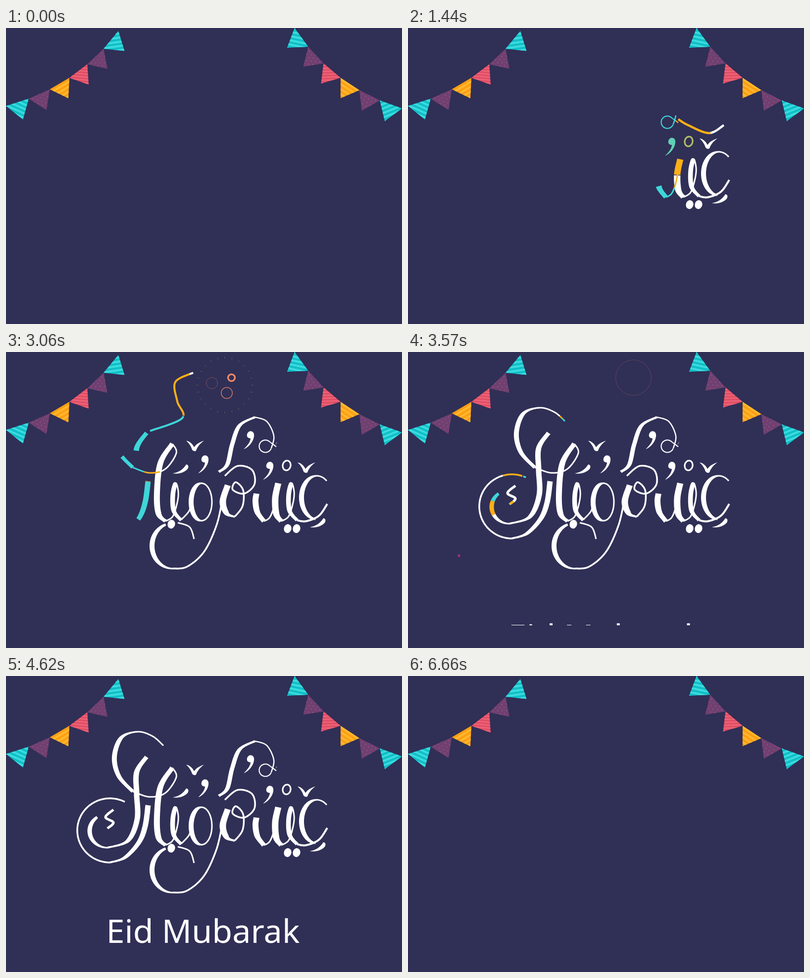
An HTML page with a canvas for the animation above (6690 ms loop, 800 by 600 pixels).

```html
<!DOCTYPE html>
<html lang="en">
<head>
<meta charset="utf-8">
<title>Eid Mubarak</title>
<style>
html, body { margin: 0; width: 100%; height: 100%; overflow: hidden; background: #302f56; }
canvas { display: block; }
</style>
</head>
<body>
<canvas id="stage" width="800" height="600"></canvas>
<script>
const ctx = document.getElementById('stage').getContext('2d');
const LOOP = 6690, CLEAR = 6660;
const BG = '#302f56', TEAL = [62, 214, 216], ORANGE = [253, 176, 22], WHITE = [255, 255, 255];

const clamp = v => Math.max(0, Math.min(1, v));
const easeOut = v => 1 - (1 - clamp(v)) ** 2;
const rgb = (c, a = 1) => `rgba(${c.map(Math.round).join()},${a})`;
const mix = (a, b, k) => a.map((v, i) => v + (b[i] - v) * k);
const rad = deg => deg * Math.PI / 180;

// ---- bunting: six flags hung along a quadratic string ----
const flagStyles = {
  teal: ['#10bfc8', '#3ddbdd'],
  plum: ['#704070', '#93568a'],
  red: ['#e24e65', '#ee6a7c'],
  gold: ['#ff9f12', '#ffb830']
};
const order = ['teal', 'plum', 'red', 'gold', 'plum', 'teal'];

function drawString(start, bend, end, side) {
  const at = u => start.map((s, i) => s * (1 - u) ** 2 + 2 * bend[i] * u * (1 - u) + end[i] * u * u);
  order.forEach((style, i) => drawFlag(style, at(i / 6), at((i + 1) / 6), side));
}

// Local frame: x runs along the string, the tip hangs towards side * y.
function drawFlag(style, a, b, side) {
  const [base, detail] = flagStyles[style];
  const dx = b[0] - a[0], dy = b[1] - a[1], half = Math.hypot(dx, dy) / 2;
  ctx.save();
  ctx.translate((a[0] + b[0]) / 2, (a[1] + b[1]) / 2);
  ctx.rotate(Math.atan2(dy, dx));
  ctx.beginPath();
  ctx.moveTo(-half, 0);
  ctx.lineTo(half, 0);
  ctx.lineTo(0, side * half * 1.52);
  ctx.closePath();
  ctx.fillStyle = base;
  ctx.fill();
  ctx.clip();
  ctx.rotate(style === 'gold' ? 0 : rad(-42 * side));
  ctx.fillStyle = detail;
  const thick = style === 'red' ? 2 : 4, gap = style === 'red' ? 6 : 8.5;
  for (let row = -6; row <= 6; row++) {
    if (style !== 'plum') {
      ctx.fillRect(-50, row * gap, 100, thick);
      continue;
    }
    for (let col = -5; col <= 5; col++) {
      ctx.beginPath();
      ctx.arc(col * 9 + (row & 1) * 4.5, row * 6.5, 1.1, 0, 7);
      ctx.fill();
    }
  }
  ctx.restore();
}

// ---- lettering: key points or arcs, with the width set by the pen's direction ----
function spline(text) {
  const k = text.split(',').map(s => s.trim().split(' ').map(Number));
  const pts = [k[0]];
  for (let i = 0; i < k.length - 1; i++) {
    const a = k[i - 1] || k[i], b = k[i], c = k[i + 1], d = k[i + 2] || c;
    for (let u = 1 / 24; u < 1.01; u += 1 / 24) {
      pts.push(b.map((_, j) => 0.5 * (2 * b[j] + (c[j] - a[j]) * u +
        (2 * a[j] - 5 * b[j] + 4 * c[j] - d[j]) * u * u +
        (3 * b[j] - a[j] - 3 * c[j] + d[j]) * u ** 3)));
    }
  }
  return pts;
}

function arc(cx, cy, rx, ry, from, to) {
  return Array.from({ length: 121 }, (_, i) => {
    const a = rad(from + (to - from) * i / 120);
    return [cx + rx * Math.cos(a), cy + ry * Math.sin(a)];
  });
}

const shape = s => typeof s === 'string' ? spline(s) : s;
const hair = (path, w = 3) => ({ pts: shape(path), thin: w, thick: w, dir: 1 });
const up = (thick, path) => ({ pts: shape(path), thin: 3, thick, dir: -1 });
const down = (thick, path) => ({ pts: shape(path), thin: 3, thick, dir: 1 });
const tooth = x => up(9.5, `${x + 11} 341, ${x - 4} 322, ${x - 6} 290, ${x} 266,
  ${x + 5} 283, ${x + 3} 305, ${x - 6} 333, ${x - 21} 343`);

function stroke(t0, dur, pens, opt = {}) {
  let len = 0;
  const parts = pens.map(({ pts, thin, thick, dir }) => pts.map(([x, y], i) => {
    const a = pts[Math.max(0, i - 1)], b = pts[Math.min(pts.length - 1, i + 1)];
    const d = Math.hypot(b[0] - a[0], b[1] - a[1]) || 1;
    const tx = (b[0] - a[0]) / d, ty = (b[1] - a[1]) / d;
    const r = (thin + (thick - thin) * clamp(dir * ty) ** 1.5) / 2;
    if (i) len += Math.hypot(x - a[0], y - a[1]);
    return { x, y, nx: -ty * r, ny: tx * r, len };
  }));
  const flight = opt.fly ? parts[0][parts[0].length - 1].len : 0;
  return { t0, dur, parts, len, flight, lag: opt.lag || [110, 195] };
}

function ribbon(s, from, to, color) {
  if (to <= from) return;
  ctx.fillStyle = rgb(color);
  for (const part of s.parts) {
    const run = part.filter(p => p.len >= from - 1 && p.len <= to);
    if (run.length < 2) continue;
    ctx.beginPath();
    run.forEach(p => ctx.lineTo(p.x + p.nx, p.y + p.ny));
    run.reverse().forEach(p => ctx.lineTo(p.x - p.nx, p.y - p.ny));
    ctx.fill();
  }
}

// Teal leads, orange and white follow; a flying line also loses its tail.
function drawStroke(s, t) {
  const reach = lag => s.len * easeOut((t - lag - s.t0) / s.dur);
  const tail = Math.min(s.flight, reach(230));
  const [front, mid, back] = [0, ...s.lag].map(reach);
  ribbon(s, tail, back, WHITE);
  ribbon(s, Math.max(tail, back), mid, ORANGE);
  ribbon(s, Math.max(tail, mid), front, TEAL);
}

const strokes = [
  stroke(760, 500, [down(10, arc(628, 295, 31, 44, -50, -265))]),
  stroke(890, 750, [
    hair('649 308, 632 332, 606 343, 588 341', 4),
    tooth(577),
    up(13, '556 343, 546 328, 544 296, 550 266'),
    hair('549 268, 542 310, 533 335, 521 343'),
    up(12, '521 343, 508 325, 504 303, 506 287')
  ], { lag: [125, 260] }),
  stroke(1215, 780, [
    hair('638 197, 608 213, 566 197, 546 185', 4.5),
    hair('546 192, 534 183', 2.2),
    hair(arc(524, 191, 12.5, 12.5, -40, -340), 2.2),
    hair('536 195, 541 170, 527 141, 503 132', 2.5),
    down(9, '503 132, 472 149, 457 187, 447 228, 430 243')
  ], { fly: true }),
  stroke(1848, 750, [
    hair('442 251, 468 231, 497 239, 502 268, 481 287, 458 279, 464 264, 479 280, 478 312, 462 334', 3.5),
    up(13, '462 334, 446 327, 438 303, 448 270'),
    hair('437 300, 425 352, 400 405, 366 435, 337 439', 3.5),
    up(10, arc(337, 393, 42, 46, 90, 250)),
    hair('347 346, 371 355, 380 379')
  ]),
  stroke(2200, 650, [
    up(10, arc(395, 304, 21, 38, 180, 540)),
    hair('374 302, 370 322, 354 340'),
    tooth(343),
    up(12, '322 343, 308 327, 305 285, 312 225, 336 186')
  ]),
  stroke(2863, 750, [
    hair('336 186, 344 205, 322 237, 290 245, 256 234'),
    up(10, '256 234, 228 203, 219 164, 233 125, 266 113, 296 122, 318 141')
  ], { lag: [75, 115] }),
  stroke(2860, 750, [
    hair('378 42, 342 61, 346 100, 356 134, 291 160', 4),
    down(11, '284 164, 264 195, 264 240, 265 290, 246 334, 205 348'),
    up(9, arc(205, 314, 36, 34, 90, 235))
  ], { fly: true }),
  stroke(2995, 600, [
    down(11, '287 262, 281 305, 268 338, 240 368, 210 378'),
    hair(arc(210, 313, 66, 65, 90, 297), 3.5)
  ], { lag: [65, 190] }),
  stroke(3200, 330, [hair('217 271, 201 286, 217 297, 205 309', 5)], { lag: [80, 170] })
];

// ---- small marks that pop in and turn white ----
const comma = new Path2D('M0-7.5C5-7.5 8-3 7 3C6 13-3 25-14 29C-5 21 0 13 0 7C-6 7-8 3-7-1C-6-5-3-7.5 0-7.5Z');
const bird = new Path2D('M-17-10C-9-9-4-3-1 3C4-4 11-8 19-10C9-3 5 4 3 10C1 12-3 11-5 8C-7 1-12-6-17-10Z');
const leaf = new Path2D('M-16 9C-4 7 5 1 11-9C15-9 17-5 14 0C7 8-6 11-16 9Z');
const dot = new Path2D();
dot.ellipse(0, 0, 7.5, 9, 0.3, 0, 7);
const ring = new Path2D();
ring.ellipse(0, 0, 8, 10, 0.2, 0, 7);

// shape, x, y, start
const marks = [
  [leaf, 630, 346, 900], [dot, 587, 358, 940], [dot, 569, 358, 960], [bird, 606, 234, 975],
  [ring, 567, 230, 1260], [comma, 533, 230, 1345], [comma, 494, 168, 1640], [dot, 334, 349, 2400],
  [leaf, 353, 237, 2450], [bird, 381, 190, 2520], [comma, 402, 217, 2560]
];

function drawMark([path, x, y, t0], t) {
  const age = t - t0;
  if (age <= 0) return;
  const k = (age - 60) / 200, size = easeOut(age / 90);
  const color = rgb(k < 1 ? mix(TEAL, ORANGE, clamp(k)) : mix(ORANGE, WHITE, clamp(k - 1)));
  ctx.save();
  ctx.translate(x, y);
  ctx.scale(size, size);
  ctx.fillStyle = ctx.strokeStyle = color;
  ctx.lineWidth = 3.2;
  if (path === ring) ctx.stroke(path);
  else ctx.fill(path);
  ctx.restore();
}

// ---- fireworks ----
const bursts = [
  { x: 690, y: 300, r: 100, t0: 300, pace: 1.45, from: [127, 176, 126], to: [205, 172, 95] },
  { x: 442, y: 67, r: 58, t0: 2100, pace: 1, from: [127, 176, 126], to: [205, 172, 95] },
  { x: 103, y: 413, r: 109, t0: 3562, pace: 1.45, from: [150, 50, 120], to: [225, 110, 130] }
];
// offset, final radius, delay
const halos = [[-26, -4, 12, 490], [4, 16, 15, 660], [13.5, -15, 36, 900]];

function drawBurst(b, t) {
  const age = (t - b.t0) * b.pace, u = age / 1050, scale = b.r / 58;
  if (age <= 0) return;
  ctx.save();
  ctx.translate(b.x, b.y);
  if (u < 1) {
    const outer = b.r * easeOut(u);
    const inner = Math.max(0, outer - b.r * (0.045 + 0.1 * Math.sin(Math.PI * u)));
    ctx.strokeStyle = rgb(mix(b.from, b.to, u), 1 - 0.45 * u);
    ctx.lineWidth = 0.5 + 1.6 * (1 - u);
    ctx.beginPath();
    for (let i = 0; i < 24; i++) {
      const c = Math.cos(rad(i * 15)), s = Math.sin(rad(i * 15));
      ctx.moveTo(c * inner, s * inner);
      ctx.lineTo(c * outer, s * outer);
    }
    ctx.stroke();
  }
  for (const [dx, dy, size, delay] of halos) {
    const v = (age - delay) / 600;
    if (v <= 0 || v >= 1) continue;
    const p = easeOut(v);
    ctx.strokeStyle = rgb([245, 138, 102], 1 - 0.6 * p ** 4);
    ctx.lineWidth = 3.4 * (1 - p) + 0.6;
    ctx.beginPath();
    ctx.arc(dx * scale, dy * scale, size * p * scale, 0, 7);
    ctx.stroke();
  }
  ctx.restore();
}

function drawGreeting(t) {
  if (t < 3550) return;
  ctx.save();
  ctx.beginPath();
  ctx.rect(0, 470, 800, 84);
  ctx.clip();
  ctx.fillStyle = '#fff';
  ctx.font = '66.5px "Noto Sans", "Open Sans", sans-serif';
  ctx.fillText('Eid Mubarak', 202.5, 541 + 62 * (1 - easeOut((t - 3550) / 750)));
  ctx.restore();
}

function frame() {
  const t = performance.now() % LOOP;
  ctx.fillStyle = BG;
  ctx.fillRect(0, 0, 800, 600);
  drawString([227, 6], [142.5, 120], [0, 158], -1);
  drawString([583, 0], [660.5, 120.5], [800, 163], 1);
  if (t < CLEAR) {
    bursts.forEach(b => drawBurst(b, t));
    strokes.forEach(s => drawStroke(s, t));
    marks.forEach(m => drawMark(m, t));
    drawGreeting(t);
  }
  requestAnimationFrame(frame);
}
frame();
</script>
</body>
</html>
```
